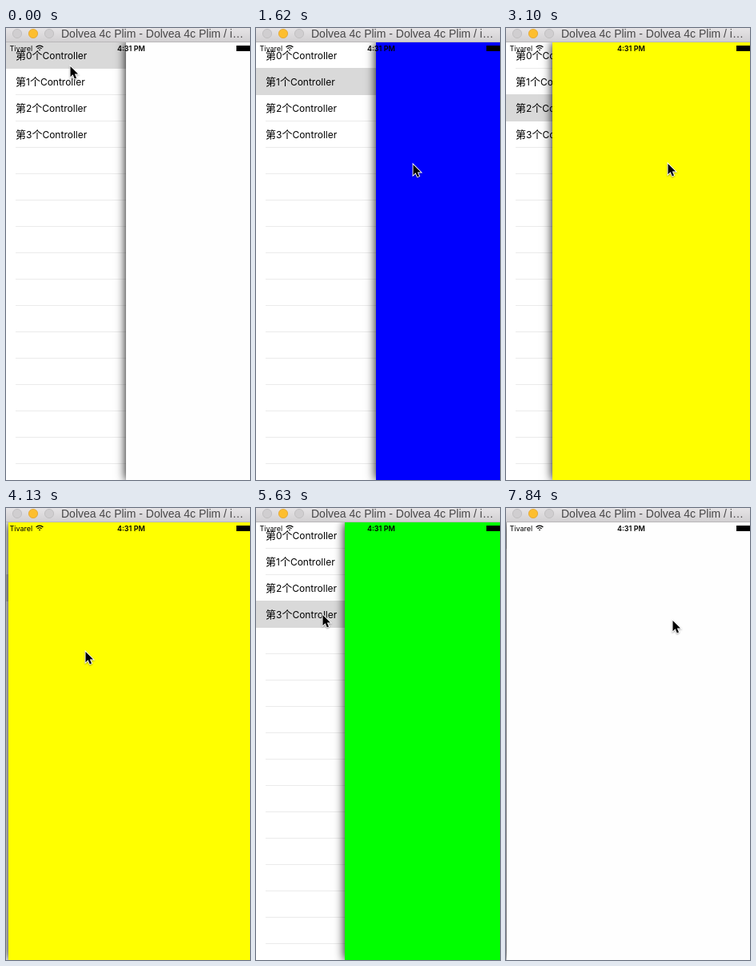
Animation, 305 px wide and 566 px high, one loop 7990 ms. Source, as an HTML page with a canvas:

```html
<!DOCTYPE html>
<html lang="zh">
<head>
<meta charset="utf-8">
<style>
  html, body { margin: 0; width: 100%; height: 100%; overflow: hidden; background: #fff; }
  canvas { display: block; }
</style>
</head>
<body>
<canvas id="stage" width="305" height="566"></canvas>
<script>
const c = document.getElementById('stage').getContext('2d');
const W = 305, H = 566, LOOP = 7990, STEP = 148;
const TOP = 18, ROW = 33, OPEN = 150;
const LATIN = 'Inter, sans-serif';
const CJK = '"Noto Sans CJK SC", "Noto Sans CJK JP", "Noto Sans CJK", sans-serif';

// All times below are counted in steps.
// Panel slides: start, duration, 1 = open / 0 = closed
const slides = [
  [3, 3, 0], [8, 3, 1], [15, 3, 0], [19, 4.72, 1], [25, 3.3, 0],
  [31, 3, 1], [37, 3, 0], [41, 3, 1], [48, 3, 0], [52, 21, 1]
];

// Selections: start, row, panel colour
const picks = [
  [0, 0, '#fefefe'], [4, 1, '#0000fe'], [16, 2, '#ffff00'],
  [38, 3, '#00ff00'], [49, 0, '#fefefe']
];

// Pointer: time, x, y
const path = [
  [0, 80, 47], [1, 68, 58], [2, 57, 67], [4, 57, 67], [7, 120, 165], [8, 120, 165],
  [10, 188, 170], [11, 196, 170], [12, 180, 150], [14, 85, 98], [16, 85, 98],
  [18, 144, 168], [19, 144, 168], [21, 202, 169], [22, 225, 170], [25, 225, 170],
  [26, 196, 173], [28, 99, 179], [30, 92, 178], [31, 92, 178], [34, 173, 172],
  [36, 83, 133], [38, 83, 133], [40, 105, 160], [41, 105, 160], [44, 185, 155],
  [45, 185, 155], [48, 80, 35], [49, 80, 35], [51, 134, 110], [52, 134, 110], [53, 208, 140]
];

const latest = (list, k) => list.filter(e => e[0] <= k).pop();
const smooth = u => u * u * (3 - 2 * u);

function panelX(k) {
  const slide = latest(slides, k);
  if (!slide) return OPEN;
  const s = smooth(Math.min(1, (k - slide[0]) / slide[1]));
  return Math.round(OPEN * (slide[2] ? s : 1 - s));
}

function pointerAt(k) {
  const a = latest(path, k);
  const b = path.find(p => p[0] > k) || a;
  const u = b === a ? 0 : (k - a[0]) / (b[0] - a[0]);
  return [1, 2].map(i => Math.round(a[i] + (b[i] - a[i]) * u));
}

function rect(color, x, y, w, h) {
  c.fillStyle = color;
  c.fillRect(x, y, w, h);
}

// Draws text and returns the x where it ends
function text(str, x, y, font, color = '#000') {
  c.font = font;
  c.fillStyle = color;
  c.fillText(str, x, y);
  return x + c.measureText(str).width;
}

function drawList(selected) {
  rect('#fff', 0, TOP, W, H - TOP);
  for (let y = TOP + ROW - 1; y < H; y += ROW) rect('#ebebeb', 12, y, W, 1);
  const y0 = TOP + selected * ROW;
  rect('#d9d9d9', 0, y0 - 1, W, ROW + 1);
  for (let i = 0; i < 4; i++) {
    const y = TOP + i * ROW + 21;
    let x = text('第', 12, y, '13px ' + CJK);
    x = text(i, x, y, '12px ' + LATIN);
    x = text('个', x, y, '13px ' + CJK);
    text('Controller', x, y, '12px ' + LATIN);
  }
}

function drawPanel(x, color) {
  c.save();
  if (x > 0) {
    c.shadowColor = '#000';
    c.shadowBlur = 12;
  }
  rect(color, x, TOP, W, H - TOP);
  c.restore();
}

function drawStatus() {
  text('Tivarel', 4.5, 29, '9px ' + LATIN);
  text('4:31 PM', 139, 29, '600 9px ' + LATIN);
  rect('#000', 288, 22, 17, 7);
  c.strokeStyle = '#000';
  c.lineWidth = 1.3;
  for (const r of [1, 3.6, 6.2]) {
    c.beginPath();
    c.arc(42, 28.4, r, -Math.PI * 0.75, -Math.PI * 0.25);
    c.stroke();
  }
}

function drawTitleBar() {
  const g = c.createLinearGradient(0, 0, 0, TOP);
  g.addColorStop(0, '#e6e4e6');
  g.addColorStop(1, '#d1cfd1');
  rect(g, 0, 0, W, TOP);
  rect('#b9b7b9', 0, TOP - 1, W, 1);
  [['#d0ced0', '#bcbabc'], ['#fdbe2f', '#e0a32c'], ['#d0ced0', '#bcbabc']].forEach(([fill, line], i) => {
    c.beginPath();
    c.arc(14 + i * 20, 7, 5.6, 0, 7);
    c.fillStyle = fill;
    c.fill();
    c.strokeStyle = line;
    c.lineWidth = 0.8;
    c.stroke();
  });
  text('Dolvea 4c Plim - Dolvea 4c Plim / i…', 69, 12, '14px "Liberation Sans", sans-serif', '#484748');
}

function drawPointer(x, y) {
  c.save();
  c.translate(x, y);
  const arrow = new Path2D('M.5 1V14.2L3.6 11.3L5.8 16.4L8 15.4L5.8 10.5H10Z');
  c.shadowColor = 'rgba(0,0,0,.35)';
  c.shadowBlur = 2;
  c.shadowOffsetY = 1;
  c.strokeStyle = '#fff';
  c.lineWidth = 1.8;
  c.stroke(arrow);
  c.shadowColor = 'transparent';
  c.fillStyle = '#000';
  c.fill(arrow);
  c.restore();
}

function draw(now) {
  const k = Math.floor((now % LOOP + 14) / STEP);
  const [, row, color] = latest(picks, k);
  drawList(row);
  drawPanel(panelX(k), color);
  drawStatus();
  drawTitleBar();
  drawPointer(...pointerAt(k));
}

let start;
function tick(now) {
  start ??= now;
  draw(now - start);
  requestAnimationFrame(tick);
}
requestAnimationFrame(tick);
</script>
</body>
</html>
```
